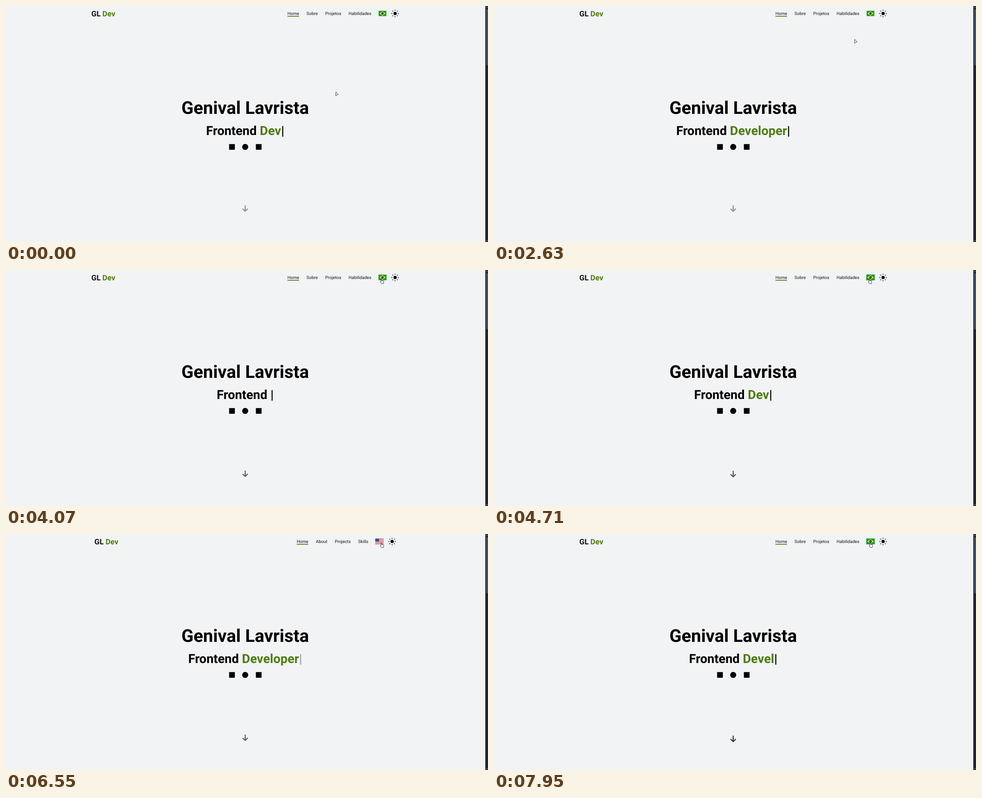
Write an HTML page that moves like this. It is 1066x525 px and loops after 8000 ms.

```html
<!DOCTYPE html>
<html lang="pt-BR">
<head>
<meta charset="utf-8">
<title>GL Dev</title>
<style>
  html, body { margin: 0; height: 100%; overflow: hidden; background: #f2f3f5; }
  svg { display: block; width: 100%; height: 100%; }
  text { font-family: Roboto, Arial, sans-serif; white-space: pre; text-rendering: geometricPrecision; }
  .bold { font-weight: 700; }
  .nav { font-size: 9.6px; fill: #111; }
  .green { fill: #4d7c0f; }
</style>
</head>
<body>
<svg viewBox="0 0 1066 525">
  <rect width="1066" height="525" fill="#f2f3f5"/>

  <text id="logo" class="bold" y="23.4" font-size="16.7" fill="#111">GL <tspan class="green">Dev</tspan></text>
  <g id="nav"></g>
  <rect id="underline" class="green" y="22" width="25.6" height="1.7"/>

  <g id="flag">
    <g id="brazil">
      <rect x="-8.5" y="-5.9" width="17" height="11.8" fill="#0b9a36"/>
      <path d="M-6.8 0L0-4.7 6.8 0 0 4.7z" fill="#fedf00"/>
      <circle r="2.7" fill="#0a2a78"/>
      <path d="M-2.5-.6Q.5-.9 2.3 1.2" fill="none" stroke="#fff" stroke-width=".5"/>
    </g>
    <g id="usa">
      <rect x="-8.5" y="-5.9" width="17" height="11.8" fill="#fff"/>
      <path id="stripes" stroke="#bd3d44" stroke-width=".91"/>
      <rect x="-8.5" y="-5.9" width="7.6" height="6.4" fill="#2b3f70"/>
      <path id="stars" stroke="#fff" stroke-width=".4" stroke-dasharray=".4 .8"/>
    </g>
  </g>

  <g id="sun">
    <circle r="3.6"/>
    <g id="rays" stroke="#000" stroke-width="1.4"></g>
  </g>

  <text class="bold" x="529" y="240" font-size="39.2" text-anchor="middle">Genival Lavrista</text>
  <text class="bold" x="529" y="287.2" font-size="27.9" text-anchor="middle">Frontend <tspan id="word" class="green"></tspan><tspan id="caret" font-weight="500">|</tspan></text>

  <rect x="493.5" y="307.2" width="12.6" height="12.6"/>
  <circle cx="529" cy="313.5" r="6.7"/>
  <rect x="552.6" y="307.2" width="12.6" height="12.6"/>

  <path id="down" d="M0-7V6M-5.8 .8L0 6.4 5.8 .8" fill="none" stroke="#000" stroke-width="2.1"/>

  <rect x="1060" width="6" height="525" fill="#222632"/>
  <rect x="1062" y="7" width="4" height="124.5" fill="#465067"/>
  <path d="M1061.5 4.5l2-2.5 2 2.5M1061.5 520.5l2 2.5 2-2.5" fill="none" stroke="#8c93a3"/>

  <g id="mouse" fill="#fff" stroke="#222" stroke-width=".9" stroke-linejoin="round">
    <path id="pointer" d="M.5.5L6.2 6.4 3 6.9.5 9.6z"/>
    <path id="hand" d="M2 1Q3 0 3.6 1.2V4.4L7 5.2Q8.2 5.6 8 7L7.2 11.4H2.8L.5 7.8Q.3 6.6 2 7.2z"/>
  </g>
</svg>
<script>
const $ = id => document.getElementById(id);
const move = (id, x, y, scale = 1) =>
  $(id).setAttribute('transform', `translate(${x} ${y}) scale(${scale})`);
const show = (id, on) => $(id).style.display = on ? '' : 'none';
const clamp = v => Math.min(1, Math.max(0, v));
const wave = turns => (1 + Math.cos(2 * Math.PI * turns)) / 2;

const LOOP = 8000;
const TO_ENGLISH = 5000, TO_PORTUGUESE = 7200, HOVER = 4000;
const LANGS = {
  pt: { logo: 188.8, flag: 832.7, sun: 860.5, items: [['Home', 622.5], ['Sobre', 664.8], ['Projetos', 706], ['Habilidades', 757.6]] },
  en: { logo: 195.6, flag: 826, sun: 853.9, items: [['Home', 642.9], ['About', 685.2], ['Projects', 727.2], ['Skills', 778.8]] }
};
// time, x, y
const MOUSE = [
  [1860, 729, 190.5], [2600, 797, 73.5], [2720, 797, 73.5], [3250, 818.5, 29],
  [3400, 817, 27], [3760, 817, 26.5], [4060, 827.5, 18.8], [7560, 827.5, 18.8], [7800, 829.3, 18.4]
];

for (let i = 0; i < 8; i++)
  $('rays').innerHTML += `<path d="M0-6.1V-8.4" transform="rotate(${i * 45})"/>`;
const rows = (n, x, y, width, step) =>
  Array.from({ length: n }, (_, i) => `M${x} ${y + i * step}h${width}`).join('');
$('stripes').setAttribute('d', rows(7, -8.5, -5.45, 17, 1.815));
$('stars').setAttribute('d', rows(5, -8, -5.2, 6.8, 1.2));

let current;
function setLang(name) {
  if (name === current) return;
  current = name;
  const lang = LANGS[name];
  $('nav').innerHTML = lang.items.map(([label, x]) => `<text class="nav" x="${x}" y="20">${label}</text>`).join('');
  $('logo').setAttribute('x', lang.logo);
  $('underline').setAttribute('x', lang.items[0][1]);
  move('sun', lang.sun, 16.6);
  show('brazil', name === 'pt');
  show('usa', name === 'en');
}

function typewriter(t) {
  const cycle = 4620, eraseStep = 166, typeStart = 1375, typeStep = 245, blinkStart = 3540;
  const u = (t - 2710 + cycle) % cycle;
  const count = u < typeStart
    ? Math.max(0, 8 - Math.floor(u / eraseStep))
    : 1 + Math.floor((u - typeStart) / typeStep);
  $('word').textContent = 'Developer'.slice(0, count);
  $('caret').setAttribute('opacity', u < blinkStart ? 1 : wave((u - blinkStart) / 1000));
}

function mouseAt(t) {
  const next = MOUSE.findIndex(key => key[0] > t);
  if (next === 0) return MOUSE[0].slice(1);
  if (next < 0) return MOUSE[MOUSE.length - 1].slice(1);
  const [a, b] = [MOUSE[next - 1], MOUSE[next]];
  const k = clamp((t - a[0]) / (b[0] - a[0])), ease = k * k * (3 - 2 * k);
  return [1, 2].map(i => a[i] + (b[i] - a[i]) * ease);
}

function draw(t) {
  setLang(t >= TO_ENGLISH && t < TO_PORTUGUESE ? 'en' : 'pt');
  typewriter(t);
  move('flag', LANGS[current].flag, 16.5, 1 + 0.1 * clamp((t - HOVER) / 150));

  const drop = wave((t - 690) / 1240);
  move('down', 529, 450 + 6.8 * drop);
  $('down').setAttribute('opacity', 0.42 + 0.54 * drop);

  move('mouse', ...mouseAt(t));
  show('pointer', t < HOVER);
  show('hand', t >= HOVER);
}

const start = performance.now();
function tick() {
  draw((performance.now() - start) % LOOP);
  requestAnimationFrame(tick);
}
draw(0);
requestAnimationFrame(tick);
</script>
</body>
</html>
```
